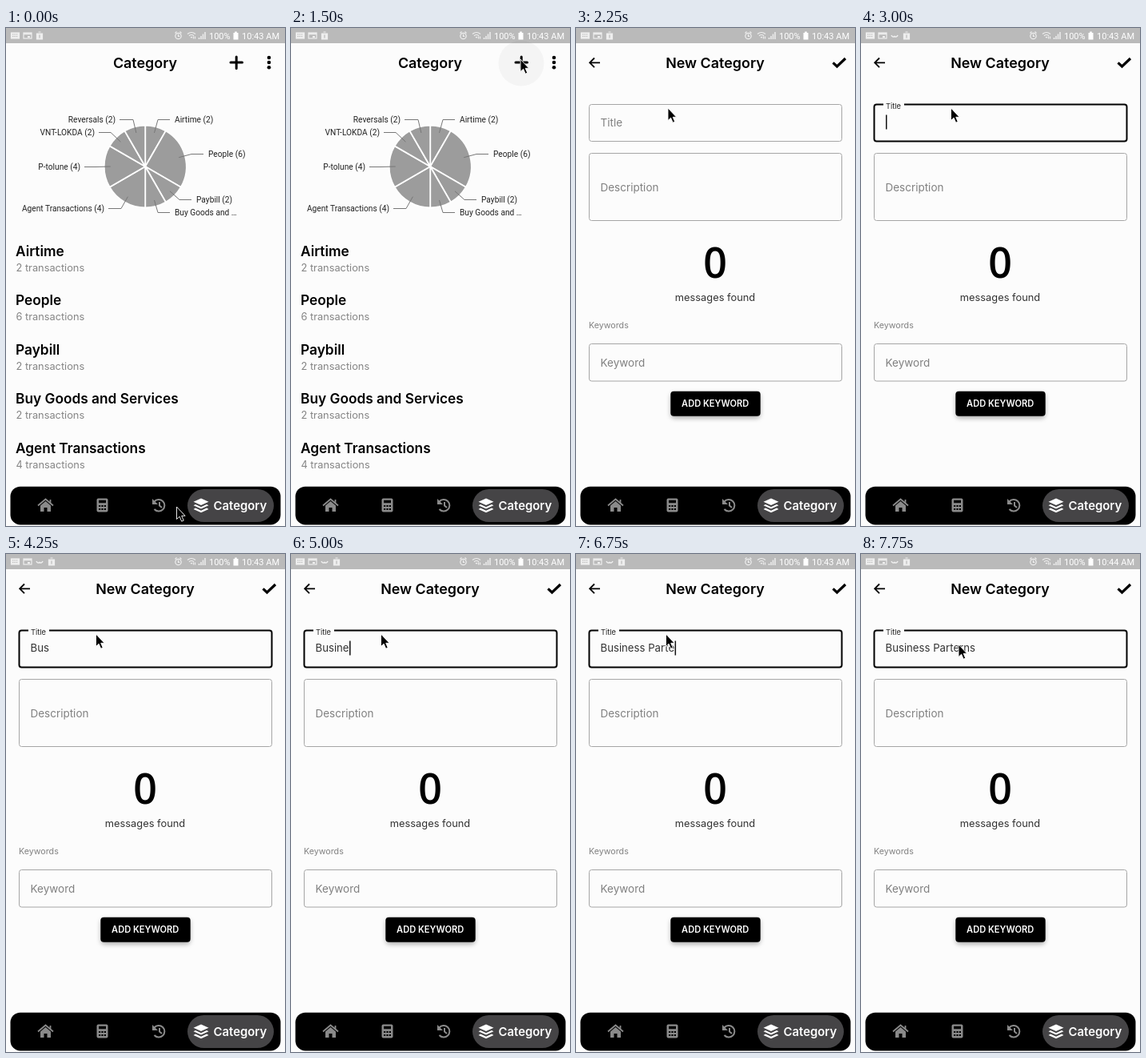
Write an HTML page that moves like this. It is 349 px wide and 622 px high and loops after 8 s.

```html
<!DOCTYPE html>
<html lang="en">
<head>
<meta charset="utf-8">
<title>New category</title>
<style>
  html, body { margin: 0; width: 100%; height: 100%; overflow: hidden; background: #fcfcfc; }
  svg { display: block; width: 349px; height: 622px; }
  text { font-family: Inter, sans-serif; white-space: pre; }
  .roboto { font-family: Roboto, sans-serif; }
  .head { font-size: 17.9px; font-weight: 600; text-anchor: middle; }
  .name { font-size: 17.3px; font-weight: 600; }
  .count { font-size: 12.8px; fill: #858585; }
  .hint { font-size: 13.5px; fill: #808080; }
  .field { fill: none; stroke: #a6a6a6; stroke-width: 1; }
  .mid { text-anchor: middle; }
  .zero { font-family: "Open Sans", sans-serif; font-size: 52px; font-weight: 600; }
</style>
</head>
<body>
<svg viewBox="0 0 349 622" xmlns="http://www.w3.org/2000/svg">
  <defs>
    <filter id="blur" x="-20%" y="-60%" width="140%" height="220%"><feGaussianBlur stdDeviation="3"/></filter>
  </defs>
  <rect width="349" height="622" fill="#fcfcfc"/>

  <g id="status">
    <rect width="349" height="19" fill="#bababa"/>
    <g fill="none" stroke="#eee" stroke-width="1.2">
      <rect x="6.5" y="6" width="10" height="7" fill="#eee"/>
      <path d="M8 8h7M8 10.5h7" stroke="#bababa" stroke-dasharray="1.4 1"/>
      <rect x="22" y="6" width="10" height="7"/>
      <path d="M22 7.200h10M27 11h3" stroke-width="2"/>
      <path id="smile" d="M38 9q1.5 3 4 1.5q2.5 1.5 4 -1.5" stroke-width="1.6"/>
      <g id="bin"><path d="M38.5 7h7v7h-7zM40.5 5h3" fill="#eee"/><path d="M42 8.5v4" stroke="#bababa"/></g>
      <circle cx="215.5" cy="10" r="3.7"/>
      <path d="M215.5 7.8v2.5h1.8M211.5 6.5l2-2M219.5 6.5l-2-2"/>
      <path d="M227 7.5q5-4 10 0M229 9.7q3-2.4 6 0M231 12q1-1 2 0M234.5 13.5v-3M236.5 13.5v-3"/>
      <path d="M241.5 14v-2M244 14v-4M246.5 14v-6.5M249 14v-9" stroke-width="1.5"/>
    </g>
    <path d="M284.5 6h1.700v-1.500h2.600V6h1.700v8.500h-6z" fill="#fff"/>
    <g fill="#fff" font-size="11">
      <text class="roboto" x="254" y="14">100%</text>
      <text class="roboto" id="clock" x="342" y="14" text-anchor="end"></text>
    </g>
  </g>

  <g id="list">
    <circle id="ripple" cx="288" cy="44" r="28.500"/>
    <text class="head" x="174" y="49.700">Category</text>
    <path d="M281 43h14.500M288.200 36v14.500" stroke="#000" stroke-width="3" stroke-linecap="round"/>
    <circle cx="329" cy="37" r="2.300"/><circle cx="329" cy="43" r="2.300"/><circle cx="329" cy="49.200" r="2.300"/>
    <g id="pie"></g>
    <g id="rows"></g>
  </g>

  <g id="form">
    <path d="M30 43.300H17.500M23 37.500l-5.800 5.800 5.800 5.800" fill="none" stroke="#000" stroke-width="1.800"/>
    <text class="head" x="174" y="49.700">New Category</text>
    <path d="M321.500 43.300l5 4.700 10.500-10" fill="none" stroke="#000" stroke-width="3.200"/>
    <rect id="box" class="field" x="16.500" y="95.500" width="316" height="46" rx="3"/>
    <rect id="notch" x="28" y="92" width="26" height="7" fill="#fcfcfc"/>
    <text id="label" class="hint">Title</text>
    <text id="typed" x="30.500" y="122" font-size="13.200" fill="#333"></text>
    <rect id="caret" y="108.500" width="1.500" height="18" fill="#111"/>
    <rect class="field" x="16.500" y="156.500" width="316" height="84" rx="3"/>
    <text class="hint" x="30.500" y="203.500">Description</text>
    <text class="mid zero" x="174" y="311.500">0</text>
    <text class="mid" x="174" y="341" font-size="12.850" fill="#333">messages found</text>
    <text x="16" y="374.500" font-size="10.700" fill="#808080">Keywords</text>
    <rect class="field" x="16.500" y="394.500" width="316" height="46.500" rx="3"/>
    <text class="hint" x="30.500" y="422.500">Keyword</text>
    <rect x="119" y="457" width="111" height="30" rx="4" opacity=".35" filter="url(#blur)"/>
    <rect x="118.300" y="453.700" width="112.400" height="31" rx="4"/>
    <text class="mid" x="174.200" y="473" font-size="11.100" font-weight="600" fill="#fff">ADD KEYWORD</text>
  </g>

  <g id="nav">
    <rect x="5.500" y="572.700" width="338" height="47.800" rx="12.500"/>
    <rect x="227" y="576" width="108" height="41" rx="20.500" fill="#454446"/>
    <g fill="#8a8a8a">
      <path d="M49.500 591l-6.500 5.500v7.500h4.500v-5h4v5h4.500v-7.500z"/>
      <path d="M40 596.500l9.500-8 9.500 8M55.500 589v4" fill="none" stroke="#8a8a8a" stroke-width="1.800"/>
      <rect x="113.500" y="587.500" width="14" height="17" rx="2"/>
      <path d="M116 591.500h9" stroke="#000" stroke-width="3.500"/>
      <path d="M116 597h9M116 601h9" stroke="#000" stroke-width="2.200" stroke-dasharray="2.200 1.200"/>
      <path d="M185.500 591.500a7.300 7.300 0 1 1 0 9.500M192 592v4.500l3 2.500" fill="none" stroke="#8a8a8a" stroke-width="2"/>
      <path d="M183 588v7h7z"/>
    </g>
    <g fill="#fff">
      <path d="M244 587.500l9.500 4.300-9.500 4.300-9.500-4.300z"/>
      <path d="M237 595l-2.500 1.300 9.500 4.300 9.500-4.300-2.500-1.300-7 3.200z"/>
      <path d="M237 599.600l-2.500 1.300 9.500 4.300 9.500-4.300-2.500-1.300-7 3.200z"/>
      <text x="259.500" y="601.700" font-size="14.900" font-weight="600">Category</text>
    </g>
  </g>

  <path id="mouse" d="M0 0V15.500L3.600 12.200 6.200 18.200 8.700 17.100 6.200 11.300H10.600Z" stroke="#fff" stroke-width=".9"/>
</svg>
<script>
const LOOP = 8000, STEP = 250;
const $ = id => document.getElementById(id);
const show = (id, on) => { $(id).style.display = on ? '' : 'none'; };
const put = (id, attrs) => { for (const k in attrs) $(id).setAttribute(k, attrs[k]); };

// name, count, label x, label y, x of the leader's bend
const slices = [
  ['Airtime', 2, 211, 114, 190],
  ['People', 6, 253, 157, 232],
  ['Paybill', 2, 238, 214, 217],
  ['Buy Goods and Services', 2, 211, 230, 190],
  ['Agent Transactions', 4, 123, 225, 144],
  ['P-tolune', 4, 93, 173, 112],
  ['VNT-LOKDA', 2, 111, 130, 131],
  ['Reversals', 2, 137, 114, 159]
];
const CX = 174.2, CY = 173;
const polar = (r, part) => {
  const a = part / 24 * 2 * Math.PI;
  return (CX + r * Math.sin(a)).toFixed(1) + ' ' + (CY - r * Math.cos(a)).toFixed(1);
};

function build() {
  let pie = '', leads = '', rows = '', sum = 0;
  slices.forEach(([name, n, x, y, bend], i) => {
    pie += `<path d="M${CX} ${CY}L${polar(51.5, sum)}A51.5 51.5 0 0 1 ${polar(51.5, sum + n)}Z" fill="#9c9c9c" stroke="#fff" stroke-width="1.8"/>`;
    const right = i < 4, end = right ? x - 6 : x + 5;
    const caption = i === 3 ? 'Buy Goods and …' : `${name} (${n})`;
    leads += `<path d="M${polar(43.5, sum + n / 2)}L${bend} ${y + 0.5}H${end}" fill="none" stroke="#777"/>` +
      `<text class="roboto" x="${x}" y="${y + 3.7}" font-size="10.2" fill="#222" text-anchor="${right ? 'start' : 'end'}">${caption}</text>`;
    if (i < 5) {
      const top = 285 + i * 61.4;
      rows += `<text class="name" x="12" y="${top}">${name}</text>` +
        `<text class="count" x="12.5" y="${top + 19}">${n} transactions</text>`;
    }
    sum += n;
  });
  $('pie').innerHTML = pie + leads;
  $('rows').innerHTML = rows;
}

// time, x, y of the pointer
const path = [
  [0, 213.5, 598], [250, 209, 603], [500, 217, 530], [1000, 274, 100], [1250, 286, 10],
  [1500, 287, 39], [1750, 252, 48], [2000, 139, 81.5], [2250, 115, 100], [2500, 112.5, 100],
  [7250, 112.5, 100], [7750, 122, 113], [LOOP, 122, 113]
];
function pointer(t) {
  const i = path.findIndex(p => p[0] > t);
  const [t0, x0, y0] = path[i - 1], [t1, x1, y1] = path[i];
  const k = (t - t0) / (t1 - t0);
  return [x0 + (x1 - x0) * k, y0 + (y1 - y0) * k];
}

// time, number of typed letters
const phrase = 'Business Parterns';
const keys = [
  [0, 0], [3250, 1], [3500, 2], [3750, 3], [4750, 4], [5000, 6], [5500, 7], [5750, 9],
  [6000, 10], [6250, 11], [6500, 13], [6750, 14], [7000, 16], [7250, 17]
];
const typed = t => phrase.slice(0, keys.filter(k => k[0] <= t).pop()[1]);

function draw(time) {
  // the screen refreshes four times a second
  const t = Math.floor(time % LOOP / STEP) * STEP;
  const focus = t >= 2750;

  show('list', t < 2250);
  show('form', t >= 2000);
  put('ripple', { opacity: t === 1500 ? 0.03 : t === 1750 ? 0.015 : 0 });

  put('box', { style: focus ? 'stroke:#000;stroke-width:2' : '' });
  show('notch', focus);
  put('label', focus
    ? { x: 31, y: 100.5, style: 'font-size:9.3px;fill:#222' }
    : { x: 30.5, y: 123, style: '' });
  $('typed').textContent = typed(t);
  const blink = t >= 4250 && t < 4750 || t >= 7750;
  show('caret', focus && !blink);
  if (focus) put('caret', { x: 31 + $('typed').getComputedTextLength() });

  show('smile', t >= 3000);
  put('bin', { transform: `translate(${t >= 3000 ? 15 : 0} 0)` });
  $('clock').textContent = t < 7000 ? '10:43 AM' : '10:44 AM';
  put('mouse', { transform: `translate(${pointer(t)})` });
}

build();
const start = performance.now();
function tick() {
  draw(performance.now() - start);
  requestAnimationFrame(tick);
}
tick();
</script>
</body>
</html>
```
